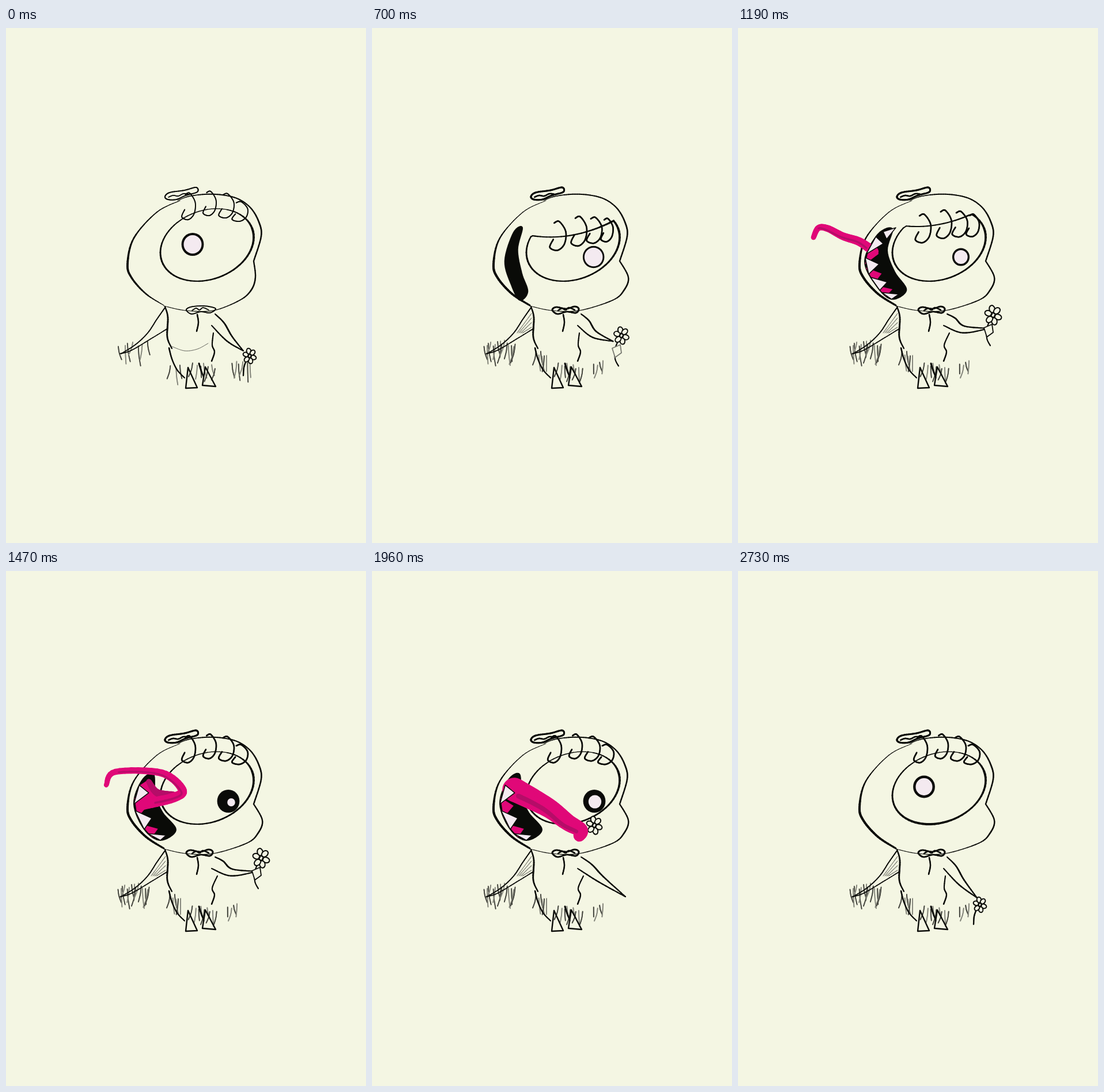
An HTML page with a canvas that plays this animation: 625 by 895 pixels, repeating every 2.8 s.

```html
<!DOCTYPE html>
<html lang="en">
<head>
<meta charset="utf-8">
<title>Hungry sketch</title>
<style>
html, body { margin: 0; width: 100%; height: 100%; overflow: hidden; background: #f4f6e3; }
canvas { display: block; width: 625px; height: 895px; }
</style>
</head>
<body>
<canvas id="stage"></canvas>
<script>
const W = 625, H = 895, STEP = 70, STEPS = 40;
const PAPER = '#f4f6e3', INK = '#0a0b08', GREY = '#77786f';
const PINK = '#e00878', DARK = '#b50d68', PALE = '#f4eaf0';
const canvas = document.getElementById('stage');
const ratio = window.devicePixelRatio || 1;
canvas.width = W * ratio;
canvas.height = H * ratio;
const ctx = canvas.getContext('2d');
ctx.scale(ratio, ratio);
ctx.lineCap = ctx.lineJoin = 'round';

const { sin, cos, PI, min, max, floor, hypot } = Math;
const mix = (a, b, t) => a + (b - a) * t;
const nums = s => typeof s === 'string' ? s.split(' ').map(Number) : s;

// Value of a keyed track [[step, numbers], ...] at a step.
function track(keys, step) {
  let i = 0;
  while (i < keys.length - 2 && step >= keys[i + 1][0]) i++;
  const [s0, a] = keys[i], [s1, b] = keys[i + 1];
  const t = min(1, max(0, (step - s0) / (s1 - s0)));
  const to = nums(b);
  return nums(a).map((v, k) => mix(v, to[k], t));
}

function curve(a, b, c, d, t) {
  const quad = 2 * a - 5 * b + 4 * c - d, cube = 3 * (b - c) + d - a;
  return b + t / 2 * (c - a + t * (quad + t * cube));
}

// Smooth samples through x y pairs, eight to a span.
function spline(list, closed) {
  const a = nums(list), n = a.length / 2, out = [];
  const at = (i, d) => a[(closed ? (i + n) % n : min(n - 1, max(0, i))) * 2 + d];
  for (let k = 0; k <= (closed ? n : n - 1) * 8; k++) {
    const i = floor(k / 8), t = k % 8 / 8;
    out.push([0, 1].map(d => curve(at(i - 1, d), at(i, d), at(i + 1, d), at(i + 2, d), t)));
  }
  return out;
}

// Brush stroke whose width runs evenly through the list of widths.
function brush(points, widths, color = INK) {
  const w = [].concat(widths);
  ctx.strokeStyle = color;
  for (let i = 1; i < points.length; i++) {
    const u = i / points.length * (w.length - 1), k = floor(u);
    ctx.lineWidth = mix(w[k], w[k + 1] ?? w[k], u - k);
    ctx.beginPath();
    ctx.moveTo(...points[i - 1]);
    ctx.lineTo(...points[i]);
    ctx.stroke();
  }
}
const ink = (list, widths, color, closed) => brush(spline(list, closed), widths, color);

function shape(points, fill, stroke, width = 1.5) {
  ctx.beginPath();
  points.forEach(p => ctx.lineTo(...p));
  ctx.closePath();
  if (fill) { ctx.fillStyle = fill; ctx.fill(); }
  if (stroke) { ctx.strokeStyle = stroke; ctx.lineWidth = width; ctx.stroke(); }
}

function oval(x, y, rx, ry, turn, fill, stroke, width) {
  ctx.beginPath();
  ctx.ellipse(x, y, rx, ry, turn, 0, 2 * PI);
  if (fill) { ctx.fillStyle = fill; ctx.fill(); }
  if (stroke) { ctx.strokeStyle = stroke; ctx.lineWidth = width; ctx.stroke(); }
}

function random(seed) {
  return () => (seed = seed * 16807 % 2147483647) / 2147483647;
}

/* Grass */

function tuft(seed, left, right, top, length, count) {
  const rnd = random(seed * 7919);
  for (let i = 0; i < count; i++) {
    const x = mix(left, right, (i + rnd() * .6) / count), y = top + rnd() * 12;
    const lean = (rnd() - .55) * 16, h = length * (.75 + rnd() * .5);
    ink([x, y, x + lean * .3, y + h / 2, x + lean, y + h], 1.8, i % 2 ? '#85867c' : '#44453e');
  }
}

function grass(s) {
  const thick = s > 8;
  tuft(3, 194, 252, 542, 28, thick ? 15 : 7);
  tuft(5, 284, 306, 560 + (thick ? 0 : 24), 26, thick ? 6 : 3);
  tuft(8, 322, 368, 580, 25, thick ? 9 : 7);
  if (thick) tuft(4, 384, 404, 577, 20, 4);
  else tuft(6, 391, 428, 572, 28, 6);
}

/* Body */

// Elbow and hand.
const ARM = [
  [0, [388, 540, 412, 561]], [1, [380, 541, 401, 567]], [8, [380, 541, 401, 567]],
  [12, [392, 524, 436, 522]], [23, [392, 524, 436, 522]],
  [26, [398, 536, 440, 566]], [28, [398, 536, 440, 566]],
  [32, [389, 545, 421, 572]], [36, [389, 545, 421, 572]], [38, [388, 541, 415, 568]]];

function arm(s) {
  const [ex, ey, hx, hy] = track(ARM, s);
  const len = hypot(hx - 360, hy - 505);
  const nx = (hy - 505) / len * 6, ny = (360 - hx) / len * 6;
  ink([363, 497, mix(365, ex, .4) + nx, mix(501, ey, .4) + ny, ex + nx, ey + ny, hx, hy], [2, 2.8, 2]);
  ink([357, 517, ex - nx, ey - ny, hx, hy], [2, 2.5, 2]);
}

function body(s) {
  const hip = s > 11 && s < 37 ? 367 : 360;
  ink('276 484 281 503 280 537 288 557', [2, 3, 2]);
  ink('283 556 288 575 297 594 310 608', [2.5, 2]);
  ink([hip, 530, 358, 551, 362, 563, 357, 579], [2, 2.4]);
  ink('332 498 334 512 331 527', s > 0 && s < 9 ? 1.5 : 2.4, s > 0 && s < 9 ? GREY : INK);
  ink('276 486 262 506 246 530 225 550 200 566', [2, 1.7]);
  ink('281 522 255 538 218 560 198 566', 1.7);
  if (s === 0) ink('287 553 310 561 332 558 351 548', 1, GREY);
  if (s > 8) for (let i = 0; i < 4; i++) ink([277, 496 + i * 8, 252 + i * 3, 530], 1.1, GREY);
  arm(s);
  shape([[316, 590], [312, 626], [332, 625]], null, INK, 2.4);
  shape([[346, 589], [341, 621], [364, 623]], null, INK, 2.4);
  ink('335 583 339 596 343 606', [3, 2]);
}

/* Flower */

const FLOWER = [
  [0, [423, 570, 11]], [8, [423, 570, 11]], [12, [443, 499, 14]],
  [23, [443, 499, 14]], [28, [386, 442, 13]], [31, [252, 400, 8]]];

function flower(s) {
  if (s > 30 && s < 37) return;
  const [x, y, r] = s > 36 ? [420, 580, 11] : track(FLOWER, s);
  if (s < 9 || s > 36) ink([x - 6, y + 8, x - 10, y + 20, x - 11, y + 34], 2.3);
  else if (s < 24) {
    ink([x - 3, y + 5, x - 10, y + 20, x - 11, y + 40, x - 5, y + 53], 2);
    shape([[x - 16, y + 22], [x - 2, y + 16], [x, y + 30], [x - 11, y + 38]], PAPER, s < 16 ? GREY : INK, 1.8);
  }
  const color = s > 0 && s < 9 ? '#4d4e48' : INK;
  for (let a = .3; a < 6.3; a += PI / 3) {
    oval(x + cos(a) * r * .62, y + sin(a) * r * .78, r * .45, r * .34, a, PAPER, color, 2);
  }
  oval(x, y, r * .27, r * .27, 0, null, color, 2);
}

/* Head and eye */

function head(s) {
  const chin = s ? 445 : 433, late = s > 8;
  ink('302 300 262 320 222 365 211 410 218 434 243 462 274 482', late ? [.8, 1.5, 4, 4, 3] : [1, 2, 3.8, 3, 1]);
  ink([274, 483, 312, 491, 360, 491, chin - 27, 473, chin - 7, 455, chin, 433, 430, 405], [1, 1.2, 2.5, 2.2]);
  ink('298 300 316 293 345 289 375 290 403 297 425 313 439 337 443 362 430 405', [.8, 2, 2, 2.6, 2.4]);
}

const LID = [[8, [0]], [11, [1]], [16, [1]], [18, [0]]];

// Tilted oval whose upper side is cut by the lid.
function rim(shut) {
  const out = [];
  for (let i = 0; i <= 72; i++) {
    const a = i * PI / 36, u = 83.4 * cos(a), v = 59.8 * sin(a);
    const x = 349 + u * .94 + v * .342, y = 377 - u * .342 + v * .94;
    const lid = 400 - 34 * ((x - 310) / 120) ** 2;
    out.push([x, max(y, lid - 110 * (1 - shut))]);
  }
  return out;
}

// Black disc x y r, then white disc x y r.
const PUPIL = [
  [0, [324, 376, 20, 324, 376, 16]], [2, [324, 376, 20, 324, 376, 16]],
  [5, [380, 398, 27, 380, 398, 25]], [8, [380, 398, 27, 380, 398, 25]],
  [11, [387, 398, 15.5, 387, 398, 12]], [17, [387, 398, 15.5, 387, 398, 12]],
  [19, [386, 400, 20, 391, 402, 7]], [24, [386, 400, 20, 391, 402, 7]],
  [28, [386, 400, 20, 387, 401, 11.5]], [32, [386, 400, 20, 386, 400, 15]],
  [36, [386, 400, 20, 386, 400, 15]], [38, [323, 375, 19.5, 323, 375, 15]]];

// Left, top, width and height of each lash, open and lidded.
const LASHES = [
  [[304, 287, 25, 46], [309, 361, 32, 52]], [[341, 284, 24, 42], [346, 350, 31, 55]],
  [[368, 288, 28, 42], [373, 350, 28, 46]], [[391, 302, 29, 34], [399, 346, 19, 43]]];
const HOOK = nums('.3 .05 .6 0 .98 .35 .9 .78 .5 1 .05 .9 .25 .62');

function eye(s) {
  const [shut] = track(LID, s);
  const edge = rim(shut);
  const [x, y, r, u, v, q] = track(PUPIL, s);
  ctx.save();
  shape(edge);
  ctx.clip();
  oval(x, y, r * .97, r, 0, INK);
  oval(u, v, q * .97, q, 0, PALE);
  ctx.restore();
  brush(edge, [4, 2.8, s > 28 ? 4 : 2.2, 3, 2, mix(1.2, 3, shut), 3.6]);
  for (const [open, lidded] of LASHES) {
    const box = open.map((n, i) => mix(n, lidded[i], shut));
    ink(HOOK.map((n, i) => box[i % 2] + n * box[2 + i % 2]), s ? 2.6 : 1.9);
  }
}

function bows(s) {
  const w = s ? 3 : 2, side = s ? 0 : 5;
  ink('276 293 284 286 310 282 330 277 332 285 312 291 296 298 281 298', w, INK, true);
  ink('282 294 290 291 299 292 308 288 317 289', w * .8);
  ink([313, 490, 320, 485, 337, 488 - side, 352, 484, 359 + side, 488, 354, 495, 338, 493, 322, 497], w * .9, INK, true);
  ink('323 491 330 487 336 490 342 486 352 490', w * .8);
}

/* Mouth and tongue */

// Outline from the top corner, down the right side and back up the left.
const WIDE = '274 347 259 385 272 426 291 458 266 473 240 447 219 405 246 356';
const GAPE = '256 353 259 390 272 420 295 450 268 468 240 449 222 405 236 364';
const GRIN = '252 349 258 385 272 424 291 457 268 463 243 436 231 400 240 357';
const MOUTH = [[12, WIDE], [16, WIDE], [19, GAPE], [29, GAPE], [31, GRIN]];
const OPEN = [[8, [.1]], [12, [1]], [35, [1]], [38, [.1]]];

// Six points from root to tip, then root and tip widths.
const TONGUE = [
  [10, '240 390 241 393 242 396 243 399 244 402 245 405 14 8'],
  [12, '236 380 229 345 222 318 221 292 214 270 218 248 16 13'],
  [14, '237 378 226 348 218 320 212 300 209 282 215 271 18 16'],
  [16, '236 385 210 371 185 362 160 350 145 345 137 362 17 9'],
  [18, '236 392 212 372 180 362 152 347 134 350 125 366 16 8'],
  [21, '236 406 290 394 306 380 270 351 190 349 174 372 19 8'],
  [23, '245 384 285 402 330 425 375 452 420 480 455 503 36 16'],
  [25, '245 384 285 402 330 425 375 452 420 480 455 503 36 16'],
  [28, '247 380 278 396 310 414 340 437 362 450 360 460 42 20'],
  [31, '243 385 245 390 247 395 249 400 251 405 253 410 18 16']];

function tongue(s) {
  const keys = track(TONGUE, s), [root, tip] = keys.splice(12);
  const path = spline(keys);
  if (s > 18 && s < 23) {
    shape([[228, 412], [230, 374], [248, 362], [262, 392], [290, 398]], PINK);
    ink('248 366 262 385 290 391', [9, 16], DARK);
  }
  brush(path, [root, tip], PINK);
  const shade = path.slice(4, 32).map(([x, y], i) => [x + sin(i / 4) * 2 - root * .15, y + root * .1]);
  brush(shade, [root * .2, tip * .3], DARK);
}

function mouth(s) {
  if (s < 9 || s > 37) return;
  const [open] = track(OPEN, s);
  const edge = spline(track(MOUTH, s).map((v, i) => i % 2 ? v : mix(245, v, open)), true);
  shape(edge, INK, INK, 2);
  if (open < .6) return;
  const count = s < 18 ? 4 : s < 31 ? 3 : 5, size = 24 / count;
  const fang = (k, reach, fill, stroke) => {
    const a = edge[floor(k)], b = edge[floor(k + size * .85)];
    shape([a, b, [(a[0] + b[0]) / 2 + reach, (a[1] + b[1]) / 2 - 3]], fill, stroke);
  };
  for (let i = 0; i < count - 1; i++) fang(32 + (i + .5) * size, 20, PINK);
  if (s > 10 && s < 31) tongue(s);
  for (let i = 0; i < count; i++) fang(32 + i * size, 21, PALE, INK);
  if (s < 18) shape([[252, 354], [274, 347], [258, 367]], PALE, INK);
}

function draw(s) {
  ctx.fillStyle = PAPER;
  ctx.fillRect(0, 0, W, H);
  [grass, body, head, eye, bows, flower, mouth].forEach(part => part(s));
}

let start, last = -1;
function tick(now) {
  start ??= now;
  const s = floor((now - start) / STEP) % STEPS;
  if (s !== last) draw(last = s);
  requestAnimationFrame(tick);
}
draw(0);
requestAnimationFrame(tick);
</script>
</body>
</html>
```
